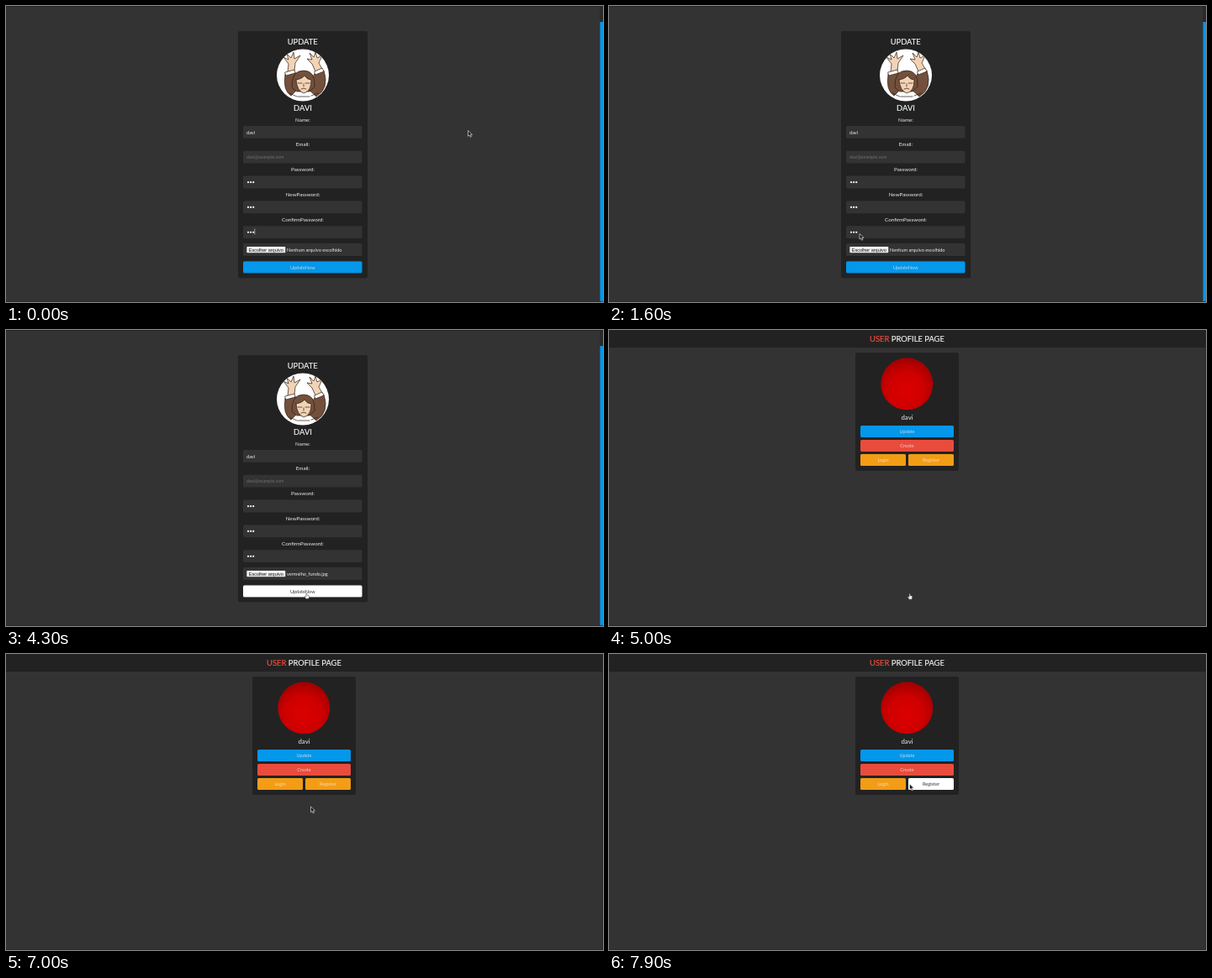
Animation of 710x353 px, one loop 8 s. Source, as an HTML page:

```html
<!DOCTYPE html>
<html lang="en">
<head>
<meta charset="utf-8">
<title>Profile update</title>
<style>
  html, body { margin: 0; width: 100%; height: 100%; overflow: hidden; background: #333; }
  svg { display: block; width: 100%; height: 100%; }
  text { font-family: Lato, "Open Sans", sans-serif; font-size: 5.6px; fill: #eee; }
  .mid { text-anchor: middle; }
  .title { font-size: 9.4px; stroke: #eee; stroke-width: .2px; }
  .label { font-size: 6.25px; }
  .hint { font-size: 5.3px; fill: #707070; }
  .soft { fill: #f4ece4; fill-opacity: .8; }
  .native { font-family: "Liberation Sans", Arial, sans-serif; font-size: 5.5px; fill: #111; }
  .ink { stroke: #2b1c14; stroke-width: .7; stroke-linejoin: round; stroke-linecap: round; }
  .hover rect { fill: #fff; }
  .hover text { fill: #333; fill-opacity: 1; }
</style>
</head>
<body>
<svg id="stage" viewBox="0 0 710 353"></svg>
<script>
const LOOP = 8000, STEP = 100;
const BLUE = '#0497ea', RED = '#e84c3d', ORANGE = '#f39c16', DARK = '#222', GREY = '#333';

const rect = (x, y, w, h, fill, r = 0) =>
  `<rect x="${x}" y="${y}" width="${w}" height="${h}" rx="${r}" fill="${fill}"/>`;
const text = (x, y, s, cls = '', id = '') =>
  `<text x="${x}" y="${y}" class="${cls}" id="${id}">${s}</text>`;
const button = (x, y, w, fill, s, id = '') =>
  `<g id="${id}">${rect(x, y, w, 14, fill, 1.6)}${text(x + w / 2, y + 9, s, 'mid soft')}</g>`;
const dots = y => [288, 291.1, 294.2].map(x => `<circle cx="${x}" cy="${y}" r="1.15" fill="#eee"/>`).join('');

const avatar = `
  <clipPath id="round"><circle cx="353" cy="82.5" r="31"/></clipPath>
  <circle cx="353" cy="82.5" r="31" fill="#fff"/>
  <g clip-path="url(#round)" class="ink">
    <path fill="#73503c" d="M332 82L344 79L349 97L339 107Q329 101 332 82ZM367 81L378 77Q385 98 369 108L358 98Z"/>
    <path fill="#f3d3b5" d="M335 79L336 69L330 61L336 64L334 57L339 62L342 55L343 63L350 59L344 68L343 77Z"/>
    <path fill="#f3d3b5" d="M368 78L364 69L358 63L364 64L361 56L366 61L368 55L370 62L376 59L372 68L376 75Z"/>
    <path fill="#fff" d="M332 79L343 76L344 80L333 83ZM367 78L376 74L378 78L368 82Z"/>
    <path fill="#73503c" d="M340 97Q339 77 354 77Q368 77 367 96L361 102L346 102Z"/>
    <path fill="#f3d3b5" d="M345 88Q352 87 355 83Q358 88 363 88Q363 102 354 104Q346 101 345 88Z"/>
    <path fill="none" d="M347 92H352M356 92H361M354 93V96M351 99Q354 97 357 99M337 104L346 108M363 107L371 104M347 108H361"/>
  </g>`;

const labels = ['Name:', 'Email:', 'Password:', 'NewPassword:', 'ConfirmPassword:'];
const fields = labels.map((label, i) => {
  const y = 143 + i * 29.8;
  const value = i === 0 ? text(286, y + 9.5, 'davi')
    : i === 1 ? text(286, y + 9.4, 'davi@example.com', 'hint')
    : dots(y + 7.6);
  return text(353, y - 5.5, label, 'mid label') + rect(282, y, 141.5, 14.8, GREY, 1.6) + value;
}).join('');

const updatePage = `<g id="updatePage">
  ${rect(0, 0, 710, 1, DARK)}
  ${rect(706.5, 1, 3.5, 18, '#292929')}${rect(706.5, 19, 3.5, 334, BLUE)}
  ${rect(276, 30, 154, 294.5, DARK, 2)}
  ${text(352.7, 46, 'UPDATE', 'mid title')}${avatar}${text(353, 125.4, 'DAVI', 'mid title')}
  ${fields}<g id="caret">${rect(295.6, 265.5, .6, 7, '#ddd')}</g>
  ${rect(282, 283, 141.5, 15, GREY, 1.6)}${rect(286.3, 287, 46, 7.3, '#efefef', .8)}
  ${text(288.8, 292.6, 'Escolher arquivo', 'native')}${text(334, 292.6, '', '', 'file')}
  ${button(282, 304.5, 141.5, BLUE, 'UpdateNow', 'save')}
</g>`;

const profilePage = `<g id="profilePage">
  <radialGradient id="ball" cx=".48" cy=".62" r=".68">
    <stop offset="0" stop-color="#dc0000"/><stop offset=".5" stop-color="#cf0000"/><stop offset="1" stop-color="#960000"/>
  </radialGradient>
  ${rect(0, 0, 710, 21, DARK)}${rect(709, 21, 1, 332, '#292929')}
  ${text(354.5, 13.8, `<tspan fill="${RED}" stroke="${RED}">USER</tspan> PROFILE PAGE`, 'mid title')}
  ${rect(293, 27, 123, 141, DARK, 2)}
  <circle cx="354.3" cy="64.3" r="31" fill="url(#ball)"/>
  <g style="font-size:7.8px"><text x="354.5" y="106.8" class="mid" style="font-size:7.8px">davi</text></g>
  ${button(299, 114, 111, BLUE, 'Update')}${button(299, 131, 111, RED, 'Create')}
  ${button(299, 148, 54, ORANGE, 'Login')}${button(356, 148, 54, ORANGE, 'Register', 'register')}
</g>`;

const cursor = `<g id="cursor" stroke-linejoin="round">
  <path id="arrow" fill="#151515" stroke="#ddd" stroke-width=".7" d="M0 0V6.7L1.6 5.3L2.7 7.8L3.9 7.3L2.8 4.9H5Z"/>
  <path id="hand" fill="#f2f2f2" stroke="#333" stroke-width=".4" d="M-.6 0H.5V2.2L3 2.8V5L2.2 6.6H-.8L-2.4 3.8L-1.6 3.2L-.6 4Z"/>
</g>`;

const stage = document.getElementById('stage');
stage.innerHTML = rect(0, 0, 710, 353, GREY) + updatePage + profilePage + rect(0, 352.3, 710, .7, '#2a2324') + cursor;
const el = id => document.getElementById(id);
const show = (id, on) => el(id).setAttribute('visibility', on ? 'inherit' : 'hidden');

// Pointer stops: time, x, y
const stops = [
  [0, 549.5, 148.5], [300, 549.5, 148.5], [1200, 300, 263], [1400, 300, 263], [1600, 298, 271.5],
  [3500, 298, 271.5], [3600, 400, 235], [4300, 357.5, 314], [5400, 357.7, 314.8], [5700, 362, 184],
  [6900, 362, 184], [7000, 362.5, 182], [7200, 362.5, 182], [7400, 362, 185], [7500, 362, 185],
  [7900, 357.5, 155], [LOOP, 357.5, 155]
];

function pointer(t) {
  if (t >= 1600 && t < 3600) return [298, 271.5];
  const i = stops.findIndex(s => s[0] > t);
  const [t0, x0, y0] = stops[i - 1], [t1, x1, y1] = stops[i];
  const u = (t - t0) / (t1 - t0), k = u * u * (3 - 2 * u);
  return [x0 + (x1 - x0) * k, y0 + (y1 - y0) * k];
}

function draw(t) {
  const [x, y] = pointer(t), profile = t >= 5000;
  const onSave = !profile && y > 304.5, onRegister = profile && y < 162;
  show('updatePage', !profile);
  show('profilePage', profile);
  show('caret', t < 100 || (t >= 600 && t < 1100));
  el('file').textContent = t < 3700 ? 'Nenhum arquivo escolhido' : 'vermelho_fundo.jpg';
  el('save').classList.toggle('hover', onSave);
  el('register').classList.toggle('hover', onRegister);
  const hand = onSave || (t >= 5000 && t < 5100);
  show('cursor', t < 3600 || t >= 3700);
  show('arrow', !hand);
  show('hand', hand);
  if (t >= 3600 && t < 3700) { show('arrow', false); show('hand', false); }
  el('cursor').setAttribute('transform', `translate(${x} ${y})`);
}

function tick() {
  draw(Math.floor(performance.now() % LOOP / STEP) * STEP);
  requestAnimationFrame(tick);
}
tick();
</script>
</body>
</html>
```
